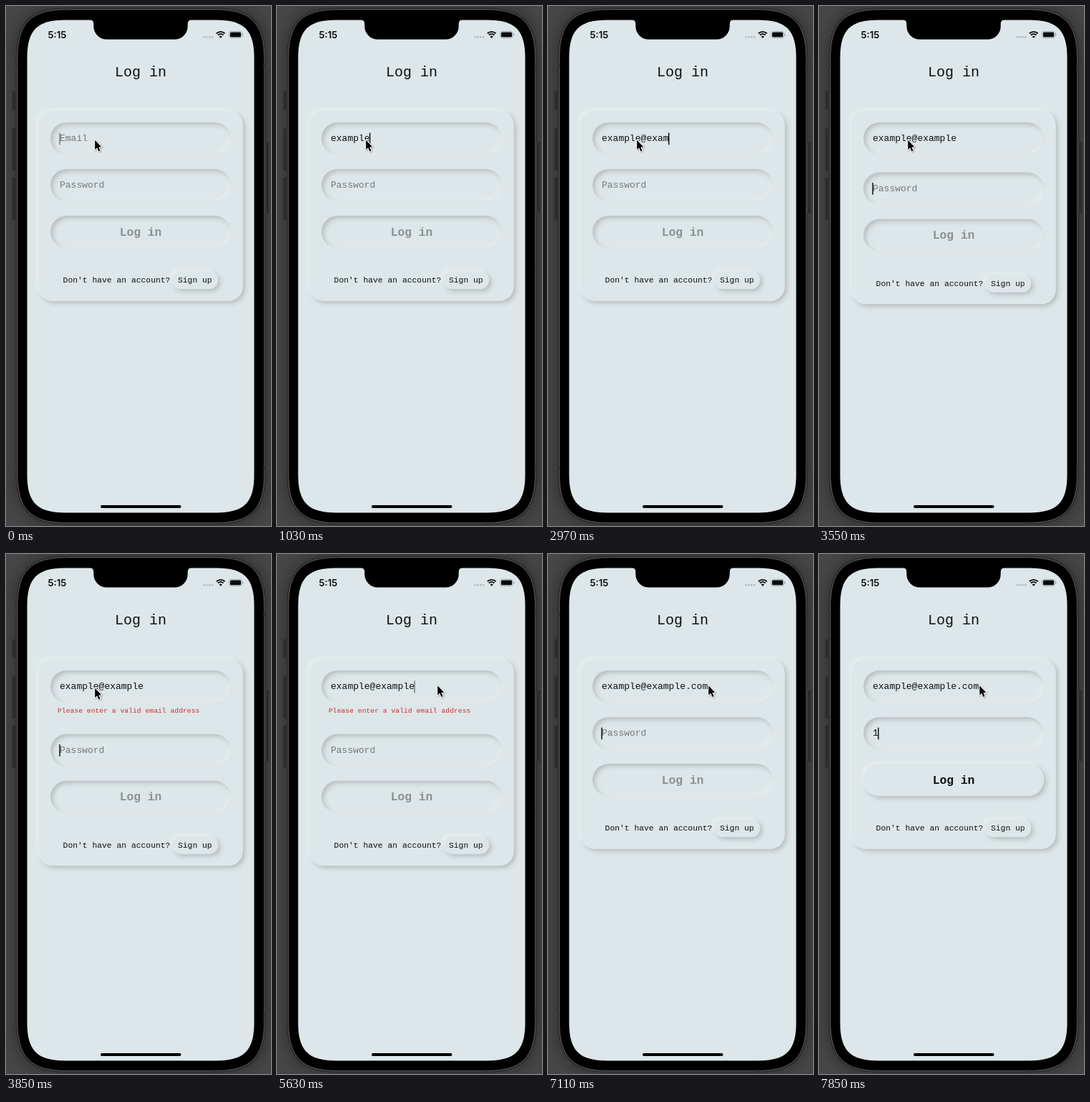
Recreate the animation shown at these times as an HTML page with a canvas. Size 370x724 px, loop 8 s.

```html
<!DOCTYPE html>
<html lang="en">
<head>
<meta charset="utf-8">
<title>Log in form</title>
<style>
  html, body { margin: 0; width: 100%; height: 100%; overflow: hidden; background: #424242; }
  canvas { display: block; width: 370px; height: 724px; }
</style>
</head>
<body>
<canvas id="stage"></canvas>
<script>
const W = 370, H = 724, LOOP = 8000;
const MONO = '"Liberation Mono", "Courier New", monospace';
const BG = '#dde6e8', INK = '#0e1112', HINT = '#747a7c';
const DARK = 'rgba(116,122,124,.38)';
const MID = 188, GROW = 23.6;

const canvas = document.getElementById('stage');
const c = canvas.getContext('2d');
const dpr = window.devicePixelRatio || 1;
canvas.width = W * dpr;
canvas.height = H * dpr;
c.scale(dpr, dpr);

// Each entry changes only the values that differ from the one before.
const steps = [
  [0, { mail: '', pass: '', focus: 'mail', caret: .5, gap: 0, err: 0, move: 0, ready: false }],
  [140, { mail: 'e', caret: 1 }],
  [290, { mail: 'ex' }],
  [440, { mail: 'exa' }],
  [740, { mail: 'exam' }],
  [885, { mail: 'examp' }],
  [1030, { mail: 'example' }],
  [1480, { caret: .5 }],
  [1630, { mail: 'example@', caret: 1 }],
  [1770, { mail: 'example@e' }],
  [1920, { mail: 'example@ex' }],
  [2070, { mail: 'example@exm' }],
  [2670, { mail: 'example@ex' }],
  [2815, { mail: 'example@exa' }],
  [2960, { mail: 'example@exam' }],
  [3110, { mail: 'example@examp' }],
  [3260, { mail: 'example@example' }],
  [3550, { focus: 'pass', gap: .195 }],
  [3700, { gap: .86, err: .86 }],
  [3850, { gap: 1, err: 1 }],
  [4150, { caret: .5 }],
  [4300, { caret: 0 }],
  [4440, { move: .1 }],
  [4590, { move: .35, caret: .5 }],
  [4740, { move: .65, caret: 1 }],
  [4890, { move: .9 }],
  [5030, { move: 1 }],
  [5180, { focus: 'mail' }],
  [5630, { caret: .5 }],
  [5780, { caret: 0 }],
  [5930, { mail: 'example@example.', caret: 1 }],
  [6220, { mail: 'example@example.c' }],
  [6370, { mail: 'example@example.co' }],
  [6520, { mail: 'example@example.com' }],
  [6820, { focus: 'pass', err: 0 }],
  [6970, { gap: .5 }],
  [7110, { gap: 0 }],
  [7550, { caret: .5 }],
  [7700, { caret: 0 }],
  [7850, { pass: '1', caret: 1, ready: true }]
];

function stateAt(t) {
  const s = {};
  for (const [at, change] of steps) if (at <= t) Object.assign(s, change);
  return s;
}

function box(x, y, w, h, r) {
  c.beginPath();
  c.roundRect(x, y, w, h, r);
}

function fillBox(x, y, w, h, r, color) {
  box(x, y, w, h, r);
  c.fillStyle = color;
  c.fill();
}

// Rounded box whose corners ease gradually into the straight sides.
function smoothBox(x, y, w, h, r) {
  const k = r * 1.3, a = r * .348, R = x + w, B = y + h;
  c.beginPath();
  c.moveTo(x + k, y);
  c.lineTo(R - k, y);
  c.bezierCurveTo(R - a, y, R, y + a, R, y + k);
  c.lineTo(R, B - k);
  c.bezierCurveTo(R, B - a, R - a, B, R - k, B);
  c.lineTo(x + k, B);
  c.bezierCurveTo(x + a, B, x, B - a, x, B - k);
  c.lineTo(x, y + k);
  c.bezierCurveTo(x, y + a, x + a, y, x + k, y);
  c.closePath();
}

function shadow(color, offset, blur) {
  c.shadowColor = color;
  c.shadowOffsetX = c.shadowOffsetY = offset * dpr;
  c.shadowBlur = blur * dpr;
}

function raised(x, y, w, h, r) {
  c.save();
  shadow(DARK, 3, 6);
  fillBox(x, y, w, h, r, BG);
  shadow('#e4ecee', -4, 4);
  fillBox(x, y, w, h, r, BG);
  c.restore();
}

function sunken(x, y, w, h) {
  const r = h / 2;
  c.save();
  box(x, y, w, h, r);
  c.clip();
  c.beginPath();
  c.rect(x - 40, y - 40, w + 80, h + 80);
  c.roundRect(x, y, w, h, r);
  c.fillStyle = BG;
  shadow('rgba(255,255,255,.3)', -3, 5);
  c.fill('evenodd');
  shadow(DARK, 3, 6);
  c.fill('evenodd');
  c.restore();
}

function text(str, x, y, font, color, align = 'left') {
  c.font = font;
  c.fillStyle = color;
  c.textAlign = align;
  c.fillText(str, x, y);
}

function field(y, value, hint, caret) {
  sunken(62, y, 252, 45);
  const font = '13px ' + MONO;
  text(value || hint, 75, y + 26.3, font, value ? INK : HINT);
  if (!caret) return;
  c.font = font;
  const x = 75 + c.measureText(value).width;
  c.globalAlpha = caret;
  fillBox(x - .7, y + 14.4, 1.5, 16.8, .5, INK);
  c.globalAlpha = 1;
}

function drawPhone() {
  c.fillStyle = '#474747';
  c.fillRect(0, 0, W, H);

  c.save();
  shadow('rgba(0,0,0,.4)', 0, 24);
  smoothBox(14, 3, 348.5, 718.5, 55);
  c.fillStyle = '#1d1d1d';
  c.fill();
  c.restore();

  // Side buttons
  for (const [x, y, h] of [[8.5, 118, 27], [8.5, 170, 60], [8.5, 238, 60], [362, 189, 100]]) {
    fillBox(x, y, 5.5, h, 1.5, '#2b2b2b');
    box(x + .5, y + .5, 4.5, h - 1, 1.5);
    c.strokeStyle = '#3a3a3a';
    c.lineWidth = 1;
    c.stroke();
  }

  smoothBox(15.5, 4.5, 345.5, 715.5, 53.5);
  c.strokeStyle = '#606060';
  c.lineWidth = 1;
  c.stroke();
  smoothBox(17, 6, 342.5, 712.5, 52);
  c.fillStyle = '#000';
  c.fill();

  // Antenna bands
  c.fillStyle = '#333';
  for (const y of [81, 640]) {
    c.fillRect(14, y, 3, 5);
    c.fillRect(359.5, y, 3, 5);
  }
  c.fillRect(81, 3, 5, 3);
  c.fillRect(290, 718.5, 5, 3);

  smoothBox(29.5, 19.5, 317, 686, 40.5);
  c.fillStyle = BG;
  c.fill();

  // Notch
  c.beginPath();
  c.moveTo(117, 19);
  c.quadraticCurveTo(122.3, 19.5, 122.3, 25);
  c.lineTo(122.3, 28);
  c.arcTo(122.3, 46.6, 141, 46.6, 18.5);
  c.arcTo(253.7, 46.6, 253.7, 28, 18.5);
  c.lineTo(253.7, 25);
  c.quadraticCurveTo(253.7, 19.5, 259, 19);
  c.closePath();
  c.fillStyle = '#000';
  c.fill();

  fillBox(132, 695, 112.5, 4, 2, '#000');
}

function drawStatus() {
  text('5:15', 58.4, 44.6, '600 13.2px Inter, sans-serif', '#080a0a');
  for (let i = 0; i < 4; i++) fillBox(275 + i * 3.9, 42, 2.7, 2.6, 1, '#b3babc');

  // Wifi
  const up = -Math.PI / 2, half = .76;
  c.strokeStyle = c.fillStyle = '#080a0a';
  c.lineWidth = 1.9;
  for (const r of [8.6, 5.5]) {
    c.beginPath();
    c.arc(299.7, 44.5, r, up - half, up + half);
    c.stroke();
  }
  c.beginPath();
  c.moveTo(299.7, 44.8);
  c.arc(299.7, 44.8, 3.2, up - half, up + half);
  c.fill();

  // Battery
  box(311.6, 35.4, 17.8, 9, 2.6);
  c.strokeStyle = '#9aa1a3';
  c.lineWidth = .8;
  c.stroke();
  fillBox(312.9, 36.6, 15.2, 6.6, 1.5, '#080a0a');
  fillBox(330.2, 38.4, 1.2, 3, .6, '#9aa1a3');
}

function drawForm(s) {
  const dy = GROW * s.gap;
  text('Log in', MID, 98.4, '20px ' + MONO, INK, 'center');
  raised(45.5, 146, 285, 264.5 + dy, 20);

  field(162, s.mail, 'Email', s.focus === 'mail' ? s.caret : 0);
  if (s.err) {
    c.globalAlpha = s.err;
    text('Please enter a valid email address', 72, 221.3, '9.73px ' + MONO, '#d32f32');
    c.globalAlpha = 1;
  }
  field(227 + dy, s.pass, 'Password', s.focus === 'pass' ? s.caret : 0);

  if (s.ready) raised(62, 292 + dy, 252, 45, 22.5);
  else sunken(62, 292 + dy, 252, 45);
  text('Log in', MID, 319.6 + dy, 'bold 16.3px ' + MONO, s.ready ? INK : '#8a9193', 'center');

  const small = '11.35px ' + MONO;
  raised(232, 369.5 + dy, 64, 24.5, 12.25);
  text("Don't have an account?", 79.6, 385 + dy, small, INK);
  text('Sign up', 240, 385 + dy, small, INK);
}

function drawPointer(move) {
  c.save();
  c.translate(124.2 + 100 * move, 186.7 - 3.4 * move);
  c.beginPath();
  const outline = [[0, 0], [0, 13.2], [3, 10.5], [5.2, 15.7], [7.3, 14.8], [5.2, 9.7], [9.1, 9.5]];
  for (const [x, y] of outline) c.lineTo(x, y);
  c.closePath();
  c.lineJoin = 'round';
  c.strokeStyle = '#fff';
  c.lineWidth = 2;
  shadow('rgba(0,0,0,.35)', .8, 2);
  c.stroke();
  shadow('transparent', 0, 0);
  c.fillStyle = '#000';
  c.fill();
  c.restore();
}

const start = performance.now();

function frame() {
  const s = stateAt((performance.now() - start) % LOOP);
  drawPhone();
  drawStatus();
  drawForm(s);
  drawPointer(s.move);
  requestAnimationFrame(frame);
}
frame();
</script>
</body>
</html>
```
